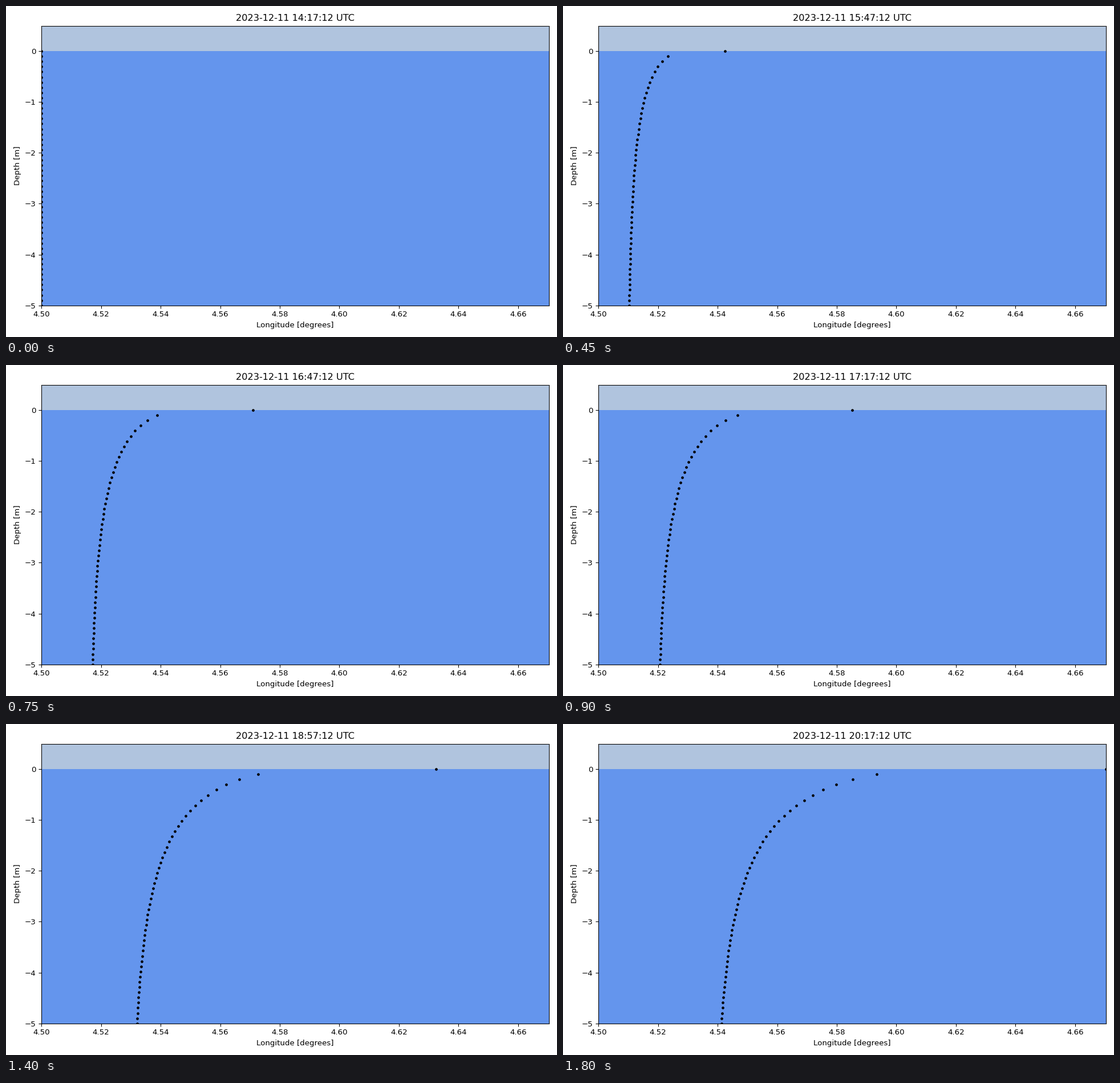
Recreate the animation shown at these times as a matplotlib script. Size 966 px wide and 580 px high, loop 1.85 s.

```python
import math

import matplotlib.pyplot as plt
import numpy as np
from matplotlib.animation import FuncAnimation

W, H, DPI = 966, 580, 96.6
FRAMES, INTERVAL = 37, 50
START_MIN = 14 * 60 + 17      # first clock reading, minutes after midnight
STEP_MIN = 10
LON0 = 4.5

# Total eastward drift in degrees over the whole run
SURFACE = 0.17028             # wind-driven float at the surface
CURRENT = 0.03895             # uniform current
STOKES = 0.07776              # wave drift just below the surface
DECAY = 0.35                  # twice the wavenumber, 1/m


def wave_profile(depth):
    """Phillips-spectrum decay of the wave drift with depth."""
    x = math.sqrt(DECAY * depth)
    return math.exp(-x * x) - math.sqrt(math.pi) * x * math.erfc(x)


def clock(i):
    hour, minute = divmod(START_MIN + i * STEP_MIN, 60)
    return f"2023-12-11 {hour:02d}:{minute:02d}:12 UTC"


z = np.linspace(0, -5, 50)
drift = np.array([CURRENT + STOKES * wave_profile(-d) for d in z])
drift[0] = SURFACE

plt.rcParams["font.family"] = "DejaVu Sans"
# The tiny margin keeps the pixel size from being rounded down
fig, ax = plt.subplots(figsize=((W + 1e-6) / DPI, (H + 1e-6) / DPI), dpi=DPI,
                       facecolor="white")
ax.axhspan(0, 0.5, facecolor="lightsteelblue", edgecolor="none")
ax.axhspan(-5, 0, facecolor="cornflowerblue", edgecolor="none")
ax.set_xlim(LON0, LON0 + SURFACE)
ax.set_ylim(-5, 0.5)
ax.set_xlabel("Longitude [degrees]")
ax.set_ylabel("Depth [m]")
dots, = ax.plot([], [], "k.", markersize=5)
title = ax.set_title(clock(0))
fig.tight_layout()


def update(i):
    title.set_text(clock(i))
    dots.set_data(LON0 + drift * i / (FRAMES - 1), z)
    return dots, title


anim = FuncAnimation(fig, update, frames=FRAMES, interval=INTERVAL,
                     init_func=lambda: update(0), repeat=True, repeat_delay=0)
plt.show()
```
